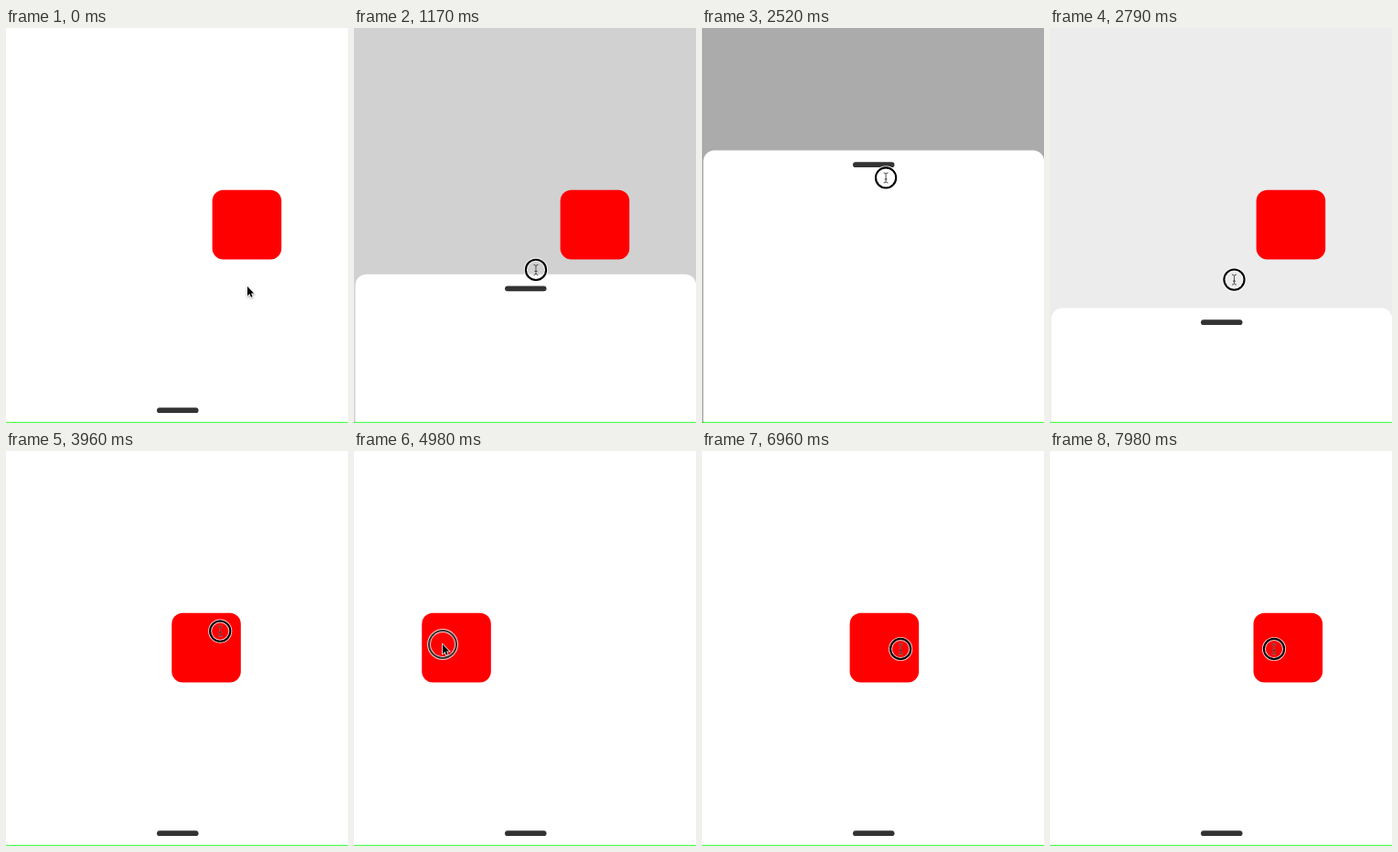
Animation of 374x431 px, one loop 8000 ms. Source, as an HTML page with a canvas:

```html
<!DOCTYPE html>
<html lang="en">
<head>
<meta charset="utf-8">
<title>Drag demo</title>
<style>
html, body { margin: 0; width: 100%; height: 100%; overflow: hidden; background: #fff; }
canvas { display: block; width: 374px; height: 431px; }
</style>
</head>
<body>
<canvas id="stage"></canvas>
<script>
const W = 374, H = 431, LOOP = 8000;
const OPEN = 123, CLOSED = 401.5;
const LEFT = 74.2, RIGHT = 225.6;

const stage = document.getElementById('stage');
const dpr = window.devicePixelRatio || 1;
stage.width = W * dpr;
stage.height = H * dpr;
const g = stage.getContext('2d');
g.scale(dpr, dpr);

const clamp = u => Math.min(1, Math.max(0, u));
const smooth = u => u * u * (3 - 2 * u);
const accelerate = u => u ** 2.44;

// Value at time t after a chain of eased moves.
function follow(t, value, moves) {
  for (const { from, to, end, ease = smooth } of moves) {
    value += (end - value) * ease(clamp((t - from) / (to - from)));
  }
  return value;
}

const move = (from, to, end, ease) => ({ from, to, end, ease });

const sheetMoves = [
  move(840, 1523, OPEN),
  move(2400, 2865, CLOSED, accelerate)
];

const boxMoves = [
  move(3660, 4500, LEFT),
  move(5010, 5250, 95.5),
  move(5250, 5460, LEFT),
  move(6000, 6240, 96),
  move(6270, 6510, LEFT),
  move(6630, 7230, RIGHT),
  move(7680, 7880, 217),
  move(7880, 8050, RIGHT)
];

const glide = (from, to, x, y) => ({ from, to, x, y });
const drag = (from, to, x, y) => ({ from, to, x, y, pressed: true });

const cursorMoves = [
  glide(30, 750, 194, 417),
  drag(840, 1460, 203, 139),
  glide(1650, 1770, 204, 138),
  glide(2040, 2300, 201, 140),
  drag(2400, 2880, 201.5, 288),
  glide(2950, 3550, 278, 192),
  drag(3660, 4600, 97, 211),
  drag(5010, 5250, 118, 213),
  glide(5640, 5880, 132, 216),
  drag(6000, 6240, 154, 217),
  glide(6300, 6600, 130, 216),
  drag(6630, 7230, 281, 216),
  glide(7290, 7620, 254, 216),
  drag(7680, 7880, 245, 216)
];
const axis = key => cursorMoves.map(m => move(m.from, m.to, m[key]));
const xMoves = axis('x'), yMoves = axis('y');
const drags = cursorMoves.filter(m => m.pressed);
const LEAD = 30, LINGER = 120;

const arrow = new Path2D('M0 0V10.2L2.4 8.1L4 11.8L5.6 11.1L4.1 7.5H7.2Z');
const beam = new Path2D('M-2.5-5.5Q0-5.5 0-4Q0-5.5 2.5-5.5M0-4V4M-2.5 5.5Q0 5.5 0 4Q0 5.5 2.5 5.5M-1.5 1.5H1.5');

function fillRound(x, y, w, h, r, color) {
  g.beginPath();
  g.roundRect(x, y, w, h, r);
  g.fillStyle = color;
  g.fill();
}

function outline(shape, width, color) {
  g.lineWidth = width;
  g.strokeStyle = color;
  g.stroke(shape);
}

function drawArrow() {
  g.save();
  g.shadowColor = 'rgba(0,0,0,.35)';
  g.shadowBlur = 2 * dpr;
  g.shadowOffsetY = dpr;
  outline(arrow, 1.5, '#fff');
  g.shadowColor = 'transparent';
  g.fillStyle = '#000';
  g.fill(arrow);
  g.restore();
}

function drawCursor(t) {
  const press = drags.find(d => t >= d.from - LEAD && t < d.to + LINGER);
  g.save();
  g.translate(follow(t, 264, xMoves), follow(t, 282, yMoves));
  if (press) {
    const age = t - press.from + LEAD;
    const grow = 1 - clamp(age / 130);
    const ring = new Path2D();
    ring.arc(0, 0, 11.1 + 3.9 * grow, 0, 2 * Math.PI);
    outline(ring, 4, 'rgba(255,255,255,.8)');
    outline(ring, 2.1, `rgba(0,0,0,${1 - 0.25 * grow})`);
    if (age < 70) drawArrow();
    else {
      outline(beam, 1.8, 'rgba(255,255,255,.35)');
      outline(beam, 0.8, '#222');
    }
  } else drawArrow();
  g.restore();
}

function draw(t) {
  const top = follow(t, CLOSED, sheetMoves);
  const openness = (CLOSED - top) / (CLOSED - OPEN);
  const gray = 255 - 84 * smooth(clamp((openness - 0.156) / 0.606));
  g.fillStyle = `rgb(${gray},${gray},${gray})`;
  g.fillRect(0, 0, W, H);
  fillRound(follow(t, RIGHT, boxMoves), 176.8, 75.6, 75.6, 12, '#f00');
  fillRound(1.5, top, 372.7, 306, 12, '#fff');
  fillRound(165, top + 12.8, 45.5, 5.8, 2.9, '#333');
  g.fillStyle = 'rgba(0,255,0,.7)';
  g.fillRect(0, 429.8, W, 1.2);
  drawCursor(t);
}

function frame() {
  draw(performance.now() % LOOP);
  requestAnimationFrame(frame);
}
frame();
</script>
</body>
</html>
```
